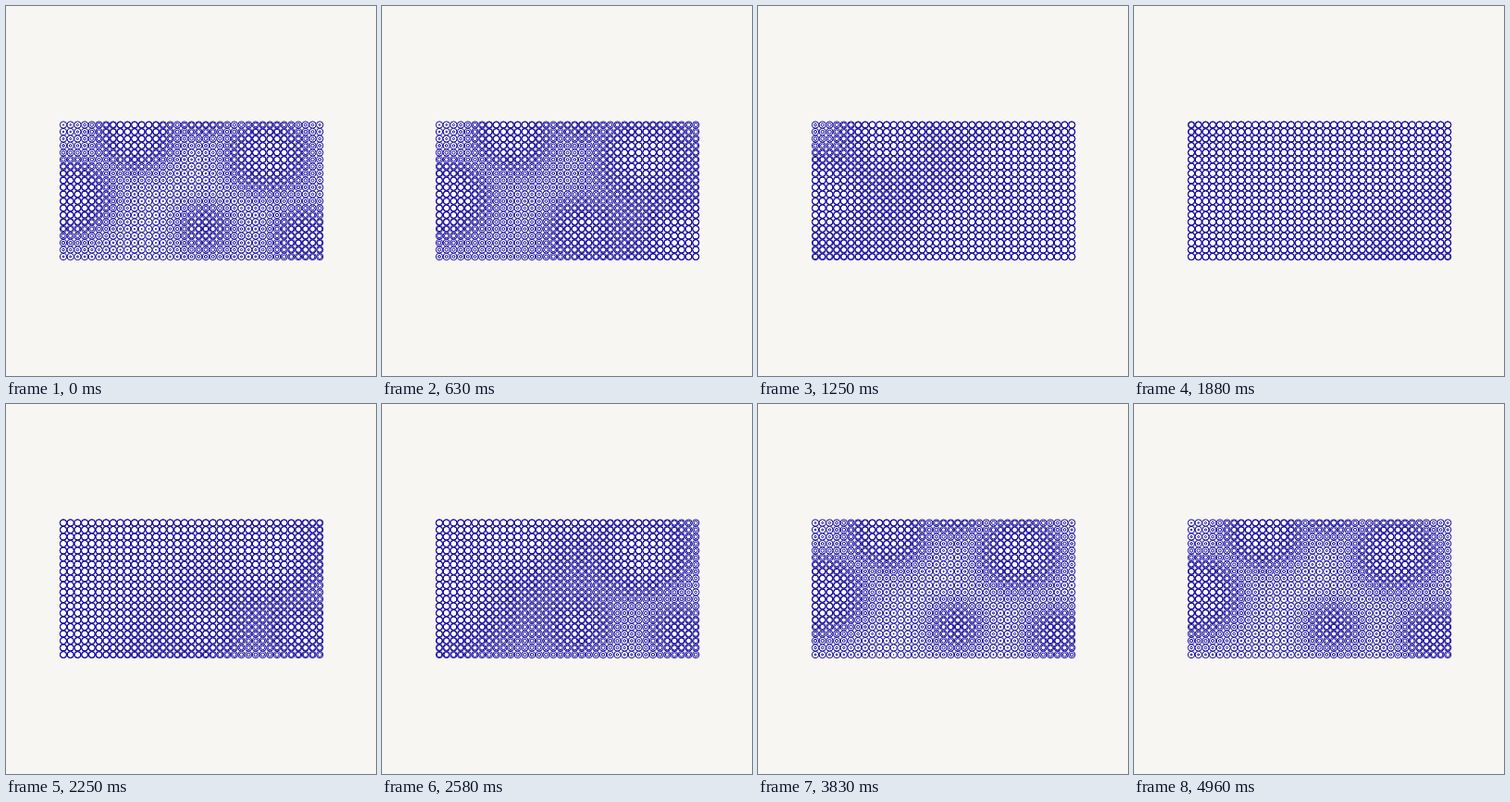
These frames come from a looping animation (400 px wide and 400 px high, 5000 ms). An HTML page with a canvas:

```html
<!DOCTYPE html>
<html lang="en">
<head>
<meta charset="utf-8">
<title>Ring grid</title>
<style>
html, body { margin: 0; height: 100%; overflow: hidden; background: #f7f6f2; }
canvas { display: block; width: 400px; height: 400px; }
</style>
</head>
<body>
<canvas id="stage"></canvas>
<script>
const LOOP = 5, COLS = 37, ROWS = 20, R = 3.65;
const canvas = document.getElementById('stage');
const ctx = canvas.getContext('2d');
const dpr = window.devicePixelRatio || 1;
canvas.width = canvas.height = 400 * dpr;
ctx.scale(dpr, dpr);

// Hills of the resting field: x, y, size
const hills = [
  [66, 207, 36], [140, 137, 34], [213, 114, 28],
  [283, 160, 34], [215, 240, 25], [323, 248, 27]
];

const smooth = u => {
  u = Math.min(1, Math.max(0, u));
  return u * u * (3 - 2 * u);
};

// Larger hills are also higher; the tallest flatten out at the top
function field(x, y) {
  const heights = hills.map(([cx, cy, size]) => {
    const d = Math.hypot((x - cx) / 1.1, y - cy) / size;
    return size / 37 * Math.exp(-d * d / 2);
  });
  return Math.min(0.89, 0.08 + Math.max(...heights));
}

// Each cell peaks later the farther it lies from the lower right corner
const cells = [];
for (let j = 0; j < ROWS; j++) {
  for (let i = 0; i < COLS; i++) {
    const x = 62 + 7.7 * i, y = 128.5 + 7.5 * j;
    const q = (i / (COLS - 1) + 0.6 * j / (ROWS - 1)) / 1.6;
    cells.push({ x, y, rest: field(x, y), peak: 2.4 - 1.3 * q });
  }
}

function swell(t, peak) {
  const d = Math.abs(t - peak);
  return smooth(1 - Math.min(d, LOOP - d) / 1.7);
}

function ring(x, y, r) {
  ctx.beginPath();
  ctx.arc(x, y, r, 0, 2 * Math.PI);
}

function draw(now) {
  const t = now / 1000 % LOOP;
  ctx.fillStyle = '#f7f6f2';
  ctx.fillRect(0, 0, 400, 400);
  ctx.fillStyle = '#fff';
  ctx.strokeStyle = '#13089a';
  for (const { x, y, rest, peak } of cells) {
    ring(x, y, R);
    ctx.fill();
    ctx.stroke();
    ring(x, y, R * (rest + (1 - rest) * swell(t, peak)));
    ctx.stroke();
  }
}

const start = performance.now();
function tick() {
  draw(performance.now() - start);
  requestAnimationFrame(tick);
}
tick();
</script>
</body>
</html>
```
